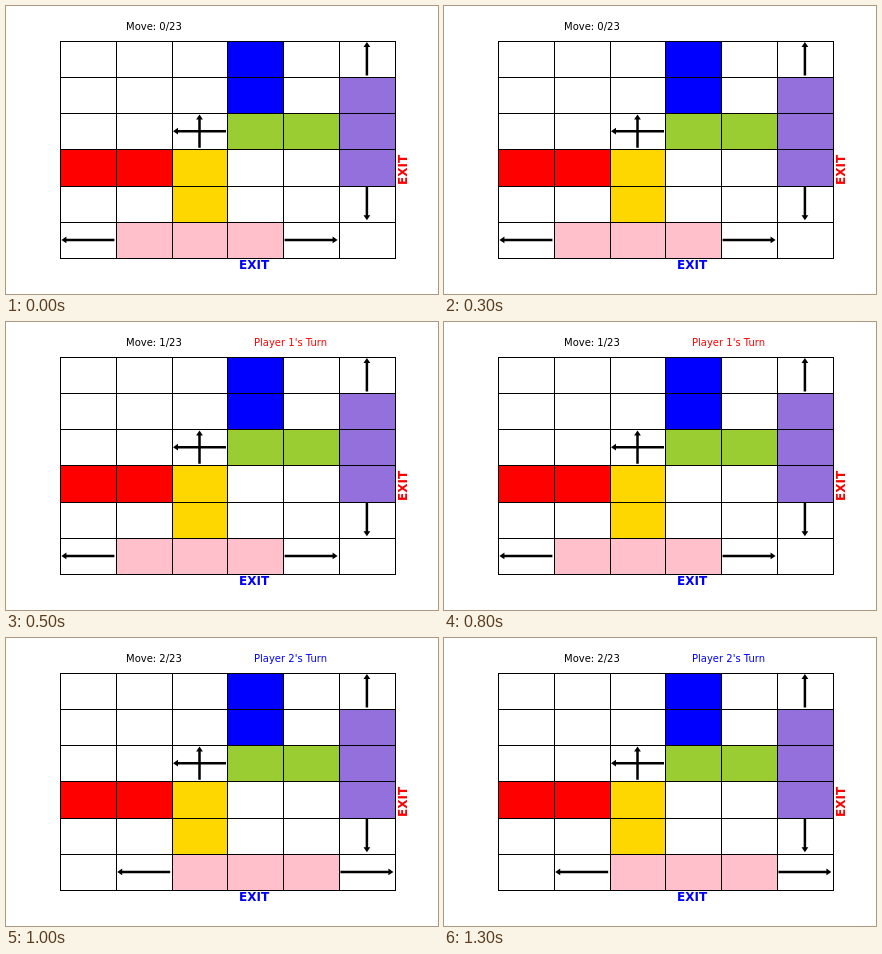
Write an HTML page that moves like this. It is 432 by 288 pixels and loops after 1500 ms.

```html
<!DOCTYPE html>
<html lang="en">
<head>
<meta charset="utf-8">
<title>Sliding blocks</title>
<style>
html, body { margin: 0; width: 100%; height: 100%; overflow: hidden; background: #fff; }
svg { display: block; }
text { font: 10px "DejaVu Sans", sans-serif; white-space: pre; }
.exit { font-size: 12px; font-weight: bold; }
</style>
</head>
<body>
<svg width="432" height="288" viewBox="0 0 432 288">
  <g id="blocks"></g>
  <path id="grid" fill="none" stroke="#000" stroke-linecap="square"/>
  <g id="arrows"></g>
  <text id="count" x="120" y="24"></text>
  <text id="turn" x="248" y="24"></text>
  <text class="exit" x="233" y="263" fill="blue">EXIT</text>
  <text class="exit" transform="translate(401 179) rotate(-90)" fill="red">EXIT</text>
</svg>
<script>
const LEFT = 54, TOP = 34.56, W = 55.8, H = 36.24, N = 6;
const STEP = 500, MOVES = 23;
const $ = id => document.getElementById(id);
const colX = c => Math.round(LEFT + c * W) + 0.5;
const rowY = r => Math.round(TOP + r * H) + 0.5;

// colour, column, row, columns wide, rows high
const blocks = [
  ["blue", 3, 0, 1, 2],
  ["yellowgreen", 3, 2, 2, 1],
  ["mediumpurple", 5, 1, 1, 3],
  ["red", 0, 3, 2, 1],
  ["gold", 2, 3, 1, 2]
];
// direction in degrees, column, row
const arrows = [[-90, 5, 0], [180, 2, 2], [-90, 2, 2], [90, 5, 4]];
const states = [
  { col: 1, text: "", color: "black" },
  { col: 1, text: "Player 1's Turn", color: "red" },
  { col: 2, text: "Player 2's Turn", color: "blue" }
];

function block([color, c, r, w, h]) {
  const x = colX(c), y = rowY(r);
  return `<rect x="${x}" y="${y}" width="${colX(c + w) - x}" height="${rowY(r + h) - y}" fill="${color}"/>`;
}

function arrow([angle, c, r]) {
  const half = Math.abs(angle) === 90 ? 16.7 : 26.5;
  const x = LEFT + (c + 0.5) * W, y = TOP + (r + 0.5) * H;
  const neck = half - 5;
  return `<path transform="translate(${x} ${y}) rotate(${angle})"
    d="M${-half} -1.25H${neck}V-3.4L${half} 0L${neck} 3.4V1.25H${-half}Z"/>`;
}

function gridPath() {
  let d = "";
  for (let i = 0; i <= N; i++) {
    d += `M${colX(i)} ${rowY(0)}V${rowY(N)}M${colX(0)} ${rowY(i)}H${colX(N)}`;
  }
  return d;
}

let shown = -1;
function draw(time) {
  const i = Math.floor(time / STEP) % states.length;
  if (i !== shown) {
    shown = i;
    const { col, text, color } = states[i];
    $("blocks").innerHTML = [...blocks, ["pink", col, 5, 3, 1]].map(block).join("");
    $("arrows").innerHTML = [...arrows, [180, col - 1, 5], [0, col + 3, 5]].map(arrow).join("");
    $("count").textContent = `Move: ${i}/${MOVES}`;
    $("turn").textContent = text;
    $("turn").setAttribute("fill", color);
  }
}

$("grid").setAttribute("d", gridPath());
const start = performance.now();
function tick() {
  draw(performance.now() - start);
  requestAnimationFrame(tick);
}
tick();
</script>
</body>
</html>
```
